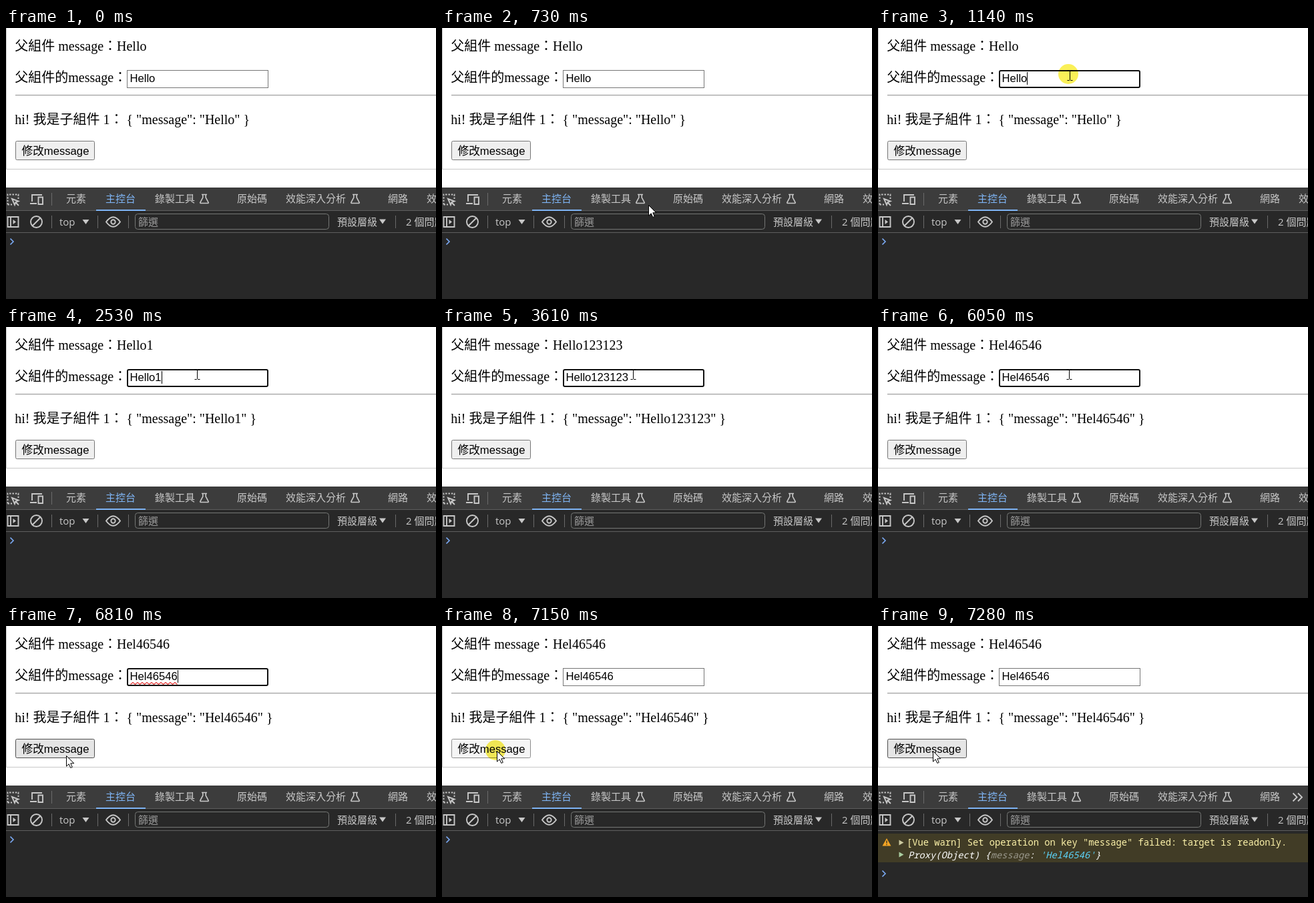
An HTML page for the animation above (8000 ms loop, 644x406 px).

```html
<!DOCTYPE html>
<html lang="zh-Hant">
<head>
<meta charset="utf-8">
<title>props demo</title>
<style>
  html, body { margin: 0; width: 100%; height: 100%; overflow: hidden; background: #fff; }
  svg { display: block; width: 644px; height: 406px; }
  text { white-space: pre; }
  .page { font: 300 20px "Liberation Serif", "Noto Sans CJK TC", "Noto Sans CJK SC", "Noto Sans CJK JP", serif; }
  .control { font: 300 16.67px "Liberation Sans", "Noto Sans CJK TC", "Noto Sans CJK SC", "Noto Sans CJK JP", sans-serif; }
  .tools { font: 15px "Open Sans", "Noto Sans CJK TC", "Noto Sans CJK SC", "Noto Sans CJK JP", sans-serif; fill: #c7c7c7; }
  .log { font: 13.75px "Noto Sans Mono", "DejaVu Sans Mono", monospace; fill: #fdf3aa; }
  .icon { fill: none; stroke: #c7c7c7; stroke-width: 1.9; }
  #halo { mix-blend-mode: multiply; }
</style>
</head>
<body>
<svg viewBox="0 0 644 406">
  <defs>
    <path id="flask" d="M-4-6.5H4M-2.2-6.5V-2L-6 5.2Q-6.6 6.5-5 6.5H5Q6.6 6.5 6 5.2L2.2-2V-6.5"/>
    <path id="down" d="M-5-3.5H5L0 3.5Z"/>
    <path id="right" d="M0-4 7 0 0 4Z"/>
  </defs>

  <!-- Web page -->
  <rect width="644" height="406" fill="#fff"/>
  <path d="M.5 0V211.5H644" fill="none" stroke="#c8c8c8"/>
  <g class="page">
    <text id="parent" x="13.3" y="34"></text>
    <text x="13.3" y="81">父組件的message：</text>
    <text id="child" x="13.3" y="144"></text>
  </g>
  <rect x="14" y="100" width="630" height="1" fill="#9a9a9a"/>
  <rect x="14" y="101" width="630" height="1" fill="#eee"/>
  <rect id="input" fill="#fff"/>
  <g class="control">
    <text id="value" x="185.4" y="81"></text>
    <rect id="button" x="14.5" y="169.5" width="118" height="28" rx="2"/>
    <text x="23.5" y="190">修改message</text>
  </g>
  <path id="squiggle" fill="none" stroke="#e23b3b" stroke-width="1.3"/>
  <rect id="caret" y="66" width="1" height="19"/>

  <!-- Developer tools -->
  <rect y="239" width="644" height="167" fill="#282828"/>
  <rect y="239" width="644" height="34" fill="#3c3c3c"/>
  <path d="M0 273.5H644M0 306.5H644" stroke="#5e5e5e"/>
  <rect x="135" y="272" width="74" height="2" fill="#7fb5f5"/>
  <path d="M68.5 247V266M68.5 281V300M137.5 281V300M183.5 281V300M583.5 281V300" stroke="#6a6a6a"/>
  <g class="icon">
    <path d="M2.5 264.5V249.5H18.5V256M2.5 264.5H9" stroke-dasharray="2.4 2"/>
    <path d="M9 256 18.5 259.5 14.5 261 13 265ZM14 261 19 266"/>
    <path d="M39 260V250H54M36 263H46M48.5 253.5H55V264H48.5Z"/>
    <use href="#flask" x="297" y="256" stroke-width="1.6"/>
    <use href="#flask" x="523" y="256" stroke-width="1.6"/>
    <path d="M2.5 283H18.5V298H2.5ZM7 283V298"/>
    <path d="M10.5 287 15 290.5 10.5 294Z" fill="#c7c7c7" stroke="none"/>
    <circle cx="45.5" cy="290.5" r="8.5"/>
    <path d="M39.5 296.5 51.5 284.5"/>
    <path d="M150 290.5Q160.5 276 171 290.5Q160.5 305 150 290.5Z"/>
    <circle cx="160.5" cy="290.5" r="3.2"/>
    <path id="more" d="M621.5 250.5 627.5 256.5 621.5 262.5M629 250.5 635 256.5 629 262.5"/>
  </g>
  <rect x="193.5" y="278.5" width="290" height="23" rx="4" fill="#282828" stroke="#757775"/>
  <g class="tools">
    <text x="90" y="261">元素</text>
    <text x="149" y="261" fill="#7fb5f5">主控台</text>
    <text x="223" y="261">錄製工具</text>
    <text x="346" y="261">原始碼</text>
    <text x="419" y="261">效能深入分析</text>
    <text x="572" y="261">網路</text>
    <text id="nextTab" x="630" y="261">效能</text>
    <text x="80" y="296">top</text>
    <use href="#down" x="119.5" y="290.5"/>
    <text x="198" y="296" fill="#9a9a9a">篩選</text>
    <text x="496" y="296">預設層級</text>
    <use href="#down" x="564" y="290"/>
    <text x="599" y="296">2 個問題</text>
  </g>
  <g id="warning" class="log">
    <rect y="311" width="644" height="43" fill="#413c26"/>
    <path d="M13 318 19.5 329.5H6.5Z" fill="#f5a524"/>
    <path d="M13 321.5V325.5M13 326.7V328.2" stroke="#413c26" stroke-width="1.5"/>
    <use href="#right" x="31.5" y="324.5" fill="#cbc9a0"/>
    <use href="#right" x="31.5" y="342.5" fill="#a9cda0"/>
    <text x="43" y="329">[Vue warn] Set operation on key "message" failed: target is readonly.</text>
    <text x="45" y="348" font-style="italic" fill="#fff">Proxy(Object) {<tspan fill="#9b998d">message</tspan>: <tspan fill="#5cd5fb">'Hel46546'</tspan>}</text>
  </g>
  <path id="prompt" d="M6.5 315.5 11 320 6.5 324.5" fill="none" stroke="#7cacf8" stroke-width="1.6"/>

  <!-- Pointer -->
  <circle id="halo" r="15" fill="#faf058"/>
  <path id="arrow" d="M.5.5V16.2L4.2 12.8 6.8 18.5 9.3 17.4 6.8 11.8H11.8Z" fill="#fff" stroke="#000"/>
  <path id="beam" d="M-4-7H-1L0-6 1-7H4M0-6V7M-4 8H-1L0 7 1 8H4" fill="none" stroke="#000"/>
</svg>
<script>
const LOOP = 8000, FOCUS = 1140, BLUR = 7100, CLICKED = 7190;
const el = Object.fromEntries([...document.querySelectorAll('svg [id]')].map(e => [e.id, e]));

// [time, message] for each keystroke
const typing = [
  [0, 'Hello'], [2530, 'Hello1'], [2670, 'Hello123'], [2890, 'Hello1231'], [3020, 'Hello123123'],
  [3670, 'Hello12312'], [3870, 'Hello1231'], [4000, 'Hello123'], [4130, 'Hello12'], [4260, 'Hello1'],
  [4390, 'Hello'], [4590, 'Hell'], [4720, 'Hel'],
  [5120, 'Hel4'], [5220, 'Hel46'], [5320, 'Hel465'], [5420, 'Hel4654'], [5520, 'Hel46546'],
];
const caretOff = [[1670, 2200], [3610, 3670], [6050, 6580]];
const halos = [[FOCUS, 1270], [BLUR, 7280]];

// [time, x, y] of the pointer, sampled in small steps
const route = [
  [460, 605, 380], [800, 112, 188], [1072, 287, 70], [1269, 287, 70], [1270, 286, 70],
  [6335, 286, 70], [6810, 90, 194], [7000, 90, 194], [7100, 82, 187], [LOOP, 82, 187],
];
const STEP = 68;

const within = (t, spans) => spans.some(([a, b]) => t >= a && t < b);
const show = (e, on) => e.setAttribute('visibility', on ? 'visible' : 'hidden');
const set = (e, attrs) => { for (const k in attrs) e.setAttribute(k, attrs[k]); };

function stepped(t) {
  if (t >= 460 && t < FOCUS) return 460 + Math.floor((t - 460) / STEP) * STEP;
  if (t >= 6400 && t < 6810) return 6400 + Math.floor((t - 6400) / STEP) * STEP;
  if (t >= 7010 && t < BLUR) return 7050;
  return t;
}

function pointerAt(t) {
  const i = Math.max(1, route.findIndex(p => p[0] > t));
  const [t0, x0, y0] = route[i - 1], [t1, x1, y1] = route[i];
  const k = Math.max(0, (t - t0) / (t1 - t0));
  return [Math.round(x0 + (x1 - x0) * k), Math.round(y0 + (y1 - y0) * k)];
}

function drawPointer(t) {
  const [x, y] = pointerAt(stepped(t));
  const visible = t >= 460;
  const inInput = x > 181 && x < 393 && y > 63 && y < 90;
  const onButton = visible && x > 14 && x < 133 && y > 169 && y < 198;
  const pressed = t >= BLUR && t < CLICKED;
  set(el.arrow, { transform: `translate(${x} ${y})` });
  set(el.beam, { transform: `translate(${x + .5} ${y + .5})` });
  set(el.halo, { cx: x - 2, cy: y - 1 });
  show(el.arrow, visible && !inInput);
  show(el.beam, visible && inInput);
  show(el.halo, within(t, halos));
  set(el.button, {
    fill: pressed ? '#f5f5f5' : onButton ? '#e5e5e5' : '#efefef',
    stroke: pressed ? '#8d8d8d' : onButton ? '#4f4f4f' : '#767676',
  });
}

function drawPage(t) {
  const message = typing.findLast(k => k[0] <= t)[1];
  const focused = t >= FOCUS && t < BLUR;
  el.parent.textContent = `父組件 message：${message}`;
  el.child.textContent = `hi! 我是子組件 1： { "message": "${message}" }`;
  el.value.textContent = message;
  set(el.input, focused
    ? { x: 182, y: 64, width: 210, height: 25, rx: 2, stroke: '#101010', 'stroke-width': 2 }
    : { x: 181.5, y: 63.5, width: 211, height: 26, rx: 0, stroke: '#767676', 'stroke-width': 1 });
  set(el.caret, { x: Math.round(185.4 + el.value.getComputedTextLength()) });
  show(el.caret, focused && !within(t, caretOff));
  show(el.squiggle, t >= 6470 && t < BLUR);
}

function drawConsole(t) {
  const warned = t >= CLICKED;
  show(el.warning, warned);
  show(el.more, warned);
  show(el.nextTab, !warned);
  set(el.prompt, { transform: `translate(0 ${warned ? 51 : 0})` });
}

function frame() {
  const t = performance.now() % LOOP;
  drawPage(t);
  drawConsole(t);
  drawPointer(t);
  requestAnimationFrame(frame);
}

set(el.squiggle, { d: 'M186.5 87.5' + 'l3.5-3 3.5 3'.repeat(10) });
frame();
</script>
</body>
</html>
```
